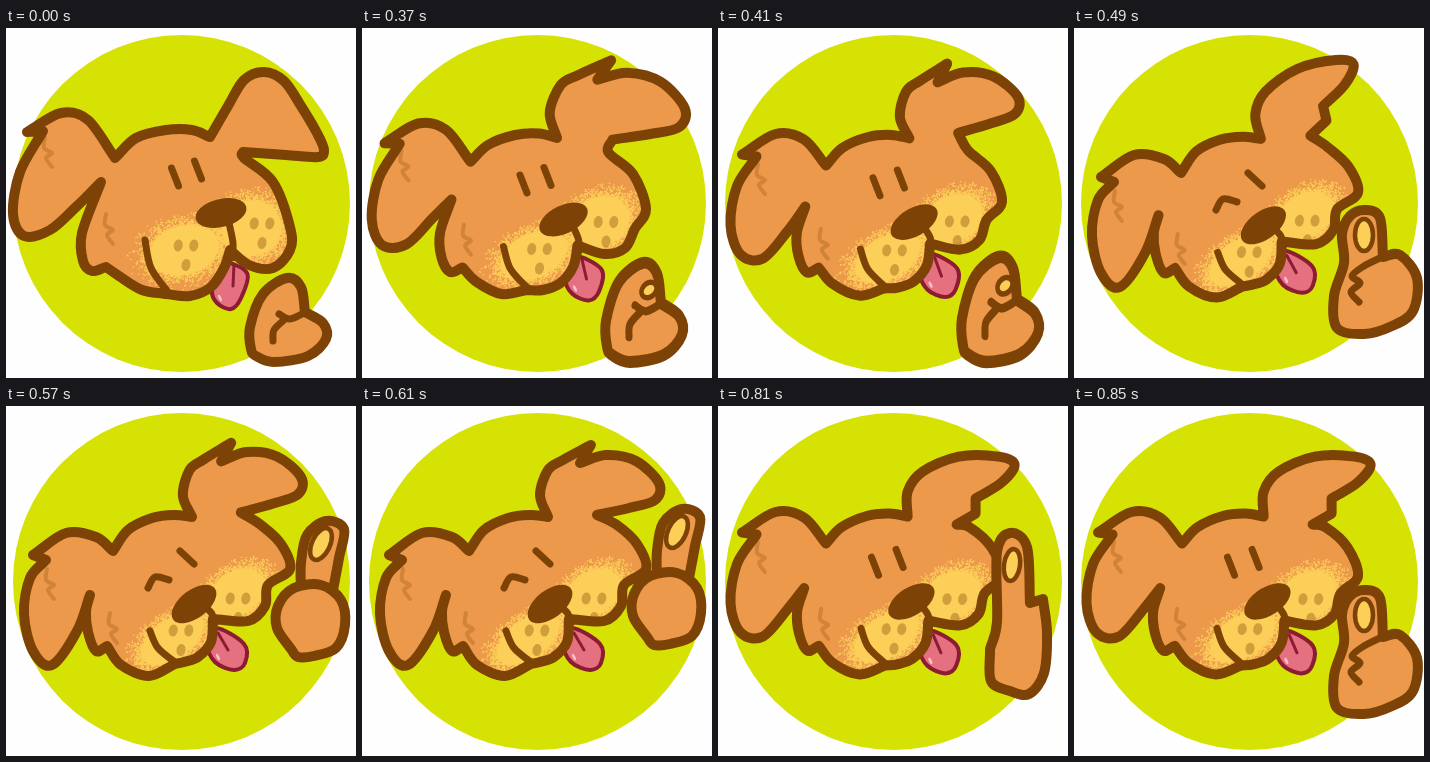
Recreate the animation shown at these times as an HTML page with a canvas. Size 350x350 px, loop 890 ms.

```html
<!DOCTYPE html>
<html lang="en">
<head>
<meta charset="utf-8">
<title>Thumbs-up puppy</title>
<style>
  html, body { margin: 0; width: 100%; height: 100%; overflow: hidden; background: #fefefe; }
  canvas { display: block; width: 350px; height: 350px; }
</style>
</head>
<body>
<canvas id="stage"></canvas>
<script>
const INK = '#7d4205', FUR = '#ec994c', CREAM = '#fccf58', LIME = '#d6e203', WINE = '#8c1c31';
const LOOP = 890;

// Points along a smooth line; "!" marks a sharp corner.
const parse = text => text.split(' ').map(item => {
  const [x, y] = item.split(',').map(parseFloat);
  return { x, y, sharp: item.endsWith('!') };
});
const lerp = (a, b, t) => a + (b - a) * t;
const mix = (from, to, t) => from.map((p, i) => ({
  x: lerp(p.x, to[i].x, t), y: lerp(p.y, to[i].y, t), sharp: p.sharp
}));
const pair = (from, to) => {
  const a = parse(from), b = parse(to);
  return t => mix(a, b, t);
};

// Each part of the face runs from head upright (0) to head tilted (1).
const face = {
  cheek: pair('160,266! 136,262 113,248 100,239! 86,243 77,233 76,205 95,154!',
              '169,258 143,270 115,259 101,240 90,245 82,226 80,205 84,189'),
  leftEar: pair('70,179 44,202 18,208 7,186 14,144 37,103! 21,104! 55,85 82,92 109,130!',
                '71,225 46,259 27,245 18,208 24,172 40,154 27,149 60,127 90,131 107,145'),
  top: pair('130,110 160,102 186,102 204,109!', '122,124 146,112 168,109 186,111'),
  rightCheek: pair('238,130 267,154 284,199 284,222 267,240 243,237 224,222!',
                   '255,119 275,138 284,163 262,179 259,200 242,215 207,213'),
  jowl: pair('218,240 205,259 184,268', '205,236 192,251 178,256'),
  mouth: pair('139,212 145,240 162,264', '144,225 152,242 170,257'),
  philtrum: pair('226,230 227,215 223,195', '207,218 206,208 198,200'),
  tongue: pair('206,262 211,275 225,281 235,270 241,245 215,235',
               '201,238 209,256 228,264 239,257 238,238 210,222'),
  crease: pair('228,236 227,258', '212,227 222,244'),
  nose: pair('215,185', '188,198'),
  eyes: pair('169,149 192,142', '154,163 179,155'),
  muzzle: pair('178,222 246,200', '166,233 231,187'),
  spots: pair('180,224 256,202', '175,231 232,199'),
  marks: pair('42,124 103,201', '44,178 107,222')
};
const shutEyes = ['142,182 149,171 163,174', '174,145 188,158'].map(parse);

// Right ear, measured from where it meets the head.
const ears = {
  flop: parse('18,-31 34,-57 54,-65 74,-56 91,-31 107,-4 114,13 108,20 76,18 33,15!'),
  out: parse('-8,-22 0,-47 15,-57 43,-72! 32,-54! 58,-62 88,-56 111,-34 107,-17 81,-9 49,-2!'),
  up: parse('0,-25 15,-45 51,-60 91,-60 107,-52 94,-34 68,-18! 68,-3! 49,8!')
};

const fist = {
  shape: parse('245,321 244,299 257,266 281,250 295,259 299,284! 317,295 320,311 302,328 268,334 250,328'),
  lines: ['298,285 284,291 273,286', '278,292 268,302 267,313'].map(parse)
};
const paws = {
  fist,
  peek: { ...fist, pad: [287, 273, 8, 6, -30] },
  thumb: {
    shape: parse('263,300 260,268 270,235 268,206 276,188 291,182 306,190 309,229! 326,227 343,250 339,283 318,298 290,306'),
    pad: [290, 207, 9, 16, 0],
    lines: [parse('306,230 290,238 278,248 286,255 277,264 285,274')]
  },
  high: {
    back: parse('295,172 295,145 301,117 320,103 338,111 333,140 327,172'),
    shape: parse('271,210 272,188 288,170 315,167 335,182 339,207 330,230 308,238 292,239 285,231!'),
    pad: [315, 126, 9, 17, 25]
  },
  edge: {
    shape: parse('273,275 272,243! 279,216 279,146 292,127 309,141 312,197! 325,193! 329,227 326,267 311,288 292,285'),
    pad: [294, 159, 8, 16, 8]
  }
};

const steps = [
  { at: 0, turn: 0, droop: 0, ear: 'flop', paw: 'fist' },
  { at: 370, turn: .5, droop: .25, ear: 'out', earTilt: 4, earSize: 1.13, paw: 'peek', stretch: 1.18 },
  { at: 410, turn: .7, droop: .5, ear: 'out', earTilt: -4, paw: 'peek', stretch: 1.25 },
  { at: 450, turn: .85, droop: .8, ear: 'up', earTilt: -8, shut: true, paw: 'thumb', lift: -5 },
  { at: 490, turn: .95, droop: 1, ear: 'up', earTilt: -13, shut: true, paw: 'thumb' },
  { at: 530, turn: 1, droop: 1, ear: 'out', earTilt: -3, shut: true, paw: 'high', lift: -12 },
  { at: 610, turn: 1, droop: 1, ear: 'out', shut: true, paw: 'high' },
  { at: 810, turn: .8, droop: .5, ear: 'up', paw: 'edge' },
  { at: 850, turn: .8, droop: .5, ear: 'up', paw: 'thumb', lift: -2 }
];

const canvas = document.getElementById('stage');
const ctx = canvas.getContext('2d');
const ratio = window.devicePixelRatio || 1;
canvas.width = canvas.height = Math.round(350 * ratio);

const radians = degrees => degrees * Math.PI / 180;

function place(points, base, tilt = 0, size = 1) {
  const c = Math.cos(radians(tilt)) * size, s = Math.sin(radians(tilt)) * size;
  return points.map(({ x, y, sharp }) => ({ x: base.x + x * c - y * s, y: base.y + x * s + y * c, sharp }));
}

function curve(pts, closed = false) {
  const n = pts.length;
  const at = i => closed ? pts[(i + n) % n] : pts[Math.max(0, Math.min(n - 1, i))];
  // Bezier handle at p, pointing towards next; corners ignore the far side.
  const handle = (p, prev, next) => {
    const from = p.sharp ? p : prev, k = p.sharp ? 1 / 3 : 1 / 6;
    return [p.x + (next.x - from.x) * k, p.y + (next.y - from.y) * k];
  };
  const path = new Path2D();
  path.moveTo(pts[0].x, pts[0].y);
  for (let i = 0; i < (closed ? n : n - 1); i++) {
    const p = at(i), q = at(i + 1);
    path.bezierCurveTo(...handle(p, at(i - 1), q), ...handle(q, at(i + 2), p), q.x, q.y);
  }
  if (closed) path.closePath();
  return path;
}

function oval(x, y, rx, ry, tilt = 0) {
  const path = new Path2D();
  path.ellipse(x, y, rx, ry, radians(tilt), 0, Math.PI * 2);
  return path;
}

function fill(path, color) {
  ctx.fillStyle = color;
  ctx.fill(path);
}

function stroke(path, width = 10, color = INK) {
  ctx.lineWidth = width;
  ctx.strokeStyle = color;
  ctx.stroke(path);
}

function seeded(seed) {
  return () => (seed = seed * 16807 % 2147483647) / 2147483647;
}

// Solid middle with a grainy edge.
function grain({ x, y }, rx, ry, tilt) {
  const random = seeded(71);
  ctx.save();
  ctx.translate(x, y);
  ctx.rotate(radians(tilt));
  fill(oval(0, 0, rx * .65, ry * .65), CREAM);
  for (let i = 0; i < 1500; i++) {
    const angle = random() * Math.PI * 2;
    const reach = .62 + .5 * random() * random();
    ctx.fillRect(Math.cos(angle) * rx * reach, Math.sin(angle) * ry * reach, 1.3, 1.3);
  }
  ctx.restore();
}

function drawFur(turn, droop) {
  const tilt = lerp(-15, -35, turn);
  const [left, right] = face.muzzle(turn);
  grain(left, 54, lerp(37, 29, turn), tilt);
  grain(right, 45, lerp(42, 32, turn), tilt);

  for (const { x, y } of face.spots(turn)) {
    for (let i = 0; i < 3; i++) {
      const angle = radians(90 + i * 120);
      fill(oval(x + 9 * Math.cos(angle), y + 13 * Math.sin(angle), 4.5, 6, 10), 'rgba(166,112,32,.5)');
    }
  }

  const squiggle = parse('-3,-15 -4,-4 4,1 -2,6 4,15');
  const marks = [face.marks(droop)[0], face.marks(turn)[1]];
  marks.forEach(spot => stroke(curve(place(squiggle, spot)), 4, 'rgba(176,104,32,.45)'));
}

function drawHead({ turn, droop, ear, earTilt, earSize, shut }) {
  const tongue = curve(face.tongue(turn), true);
  fill(tongue, '#e57080');
  stroke(tongue, 4, WINE);
  stroke(curve(face.crease(turn)), 3, WINE);
  const tip = face.tongue(turn)[1];
  fill(oval(tip.x + 3, tip.y - 5, 1.4, 3.5, -25), '#f8c3c8');

  const top = face.top(turn);
  const rightEar = place(ears[ear], top[top.length - 1], earTilt, earSize);
  const outline = curve([
    ...face.cheek(turn), ...face.leftEar(droop), ...top,
    ...rightEar, ...face.rightCheek(turn), ...face.jowl(turn)
  ], true);
  fill(outline, FUR);
  ctx.save();
  ctx.clip(outline);
  drawFur(turn, droop);
  ctx.restore();
  stroke(outline);

  stroke(curve(face.mouth(turn)), 7);
  stroke(curve(face.philtrum(turn)), 7);
  const openEye = parse('-3.5,-9 3.5,9');
  const eyes = shut ? shutEyes : face.eyes(turn).map(eye => place(openEye, eye));
  eyes.forEach(eye => stroke(curve(eye), 7));
  const [nose] = face.nose(turn);
  fill(oval(nose.x, nose.y, 26, 14, lerp(-14, -37, turn)), INK);
}

function drawPaw({ back, shape, pad, lines = [] }, lift = 0, stretch = 1) {
  const floor = 334;
  ctx.save();
  ctx.translate(0, floor - lift);
  ctx.scale(1, stretch);
  ctx.translate(0, -floor);
  const body = curve(shape, true);
  if (back) {
    fill(curve(back), FUR);
    stroke(curve(back));
  }
  fill(body, FUR);
  stroke(body);
  if (pad) {
    fill(oval(...pad), CREAM);
    stroke(oval(...pad), 4.5);
  }
  lines.forEach(line => stroke(curve(line), 7));
  ctx.restore();
}

function draw(step) {
  ctx.setTransform(ratio, 0, 0, ratio, 0, 0);
  ctx.lineCap = ctx.lineJoin = 'round';
  ctx.fillStyle = '#fefefe';
  ctx.fillRect(0, 0, 350, 350);
  fill(oval(175.5, 175.5, 168.5, 168.5), LIME);
  drawHead(step);
  drawPaw(paws[step.paw], step.lift, step.stretch);
}

const start = performance.now();
let shown;
function tick() {
  const time = (performance.now() - start) % LOOP;
  const step = steps.findLast(({ at }) => at <= time) || steps[0];
  if (step !== shown) draw(shown = step);
  requestAnimationFrame(tick);
}
tick();
</script>
</body>
</html>
```
